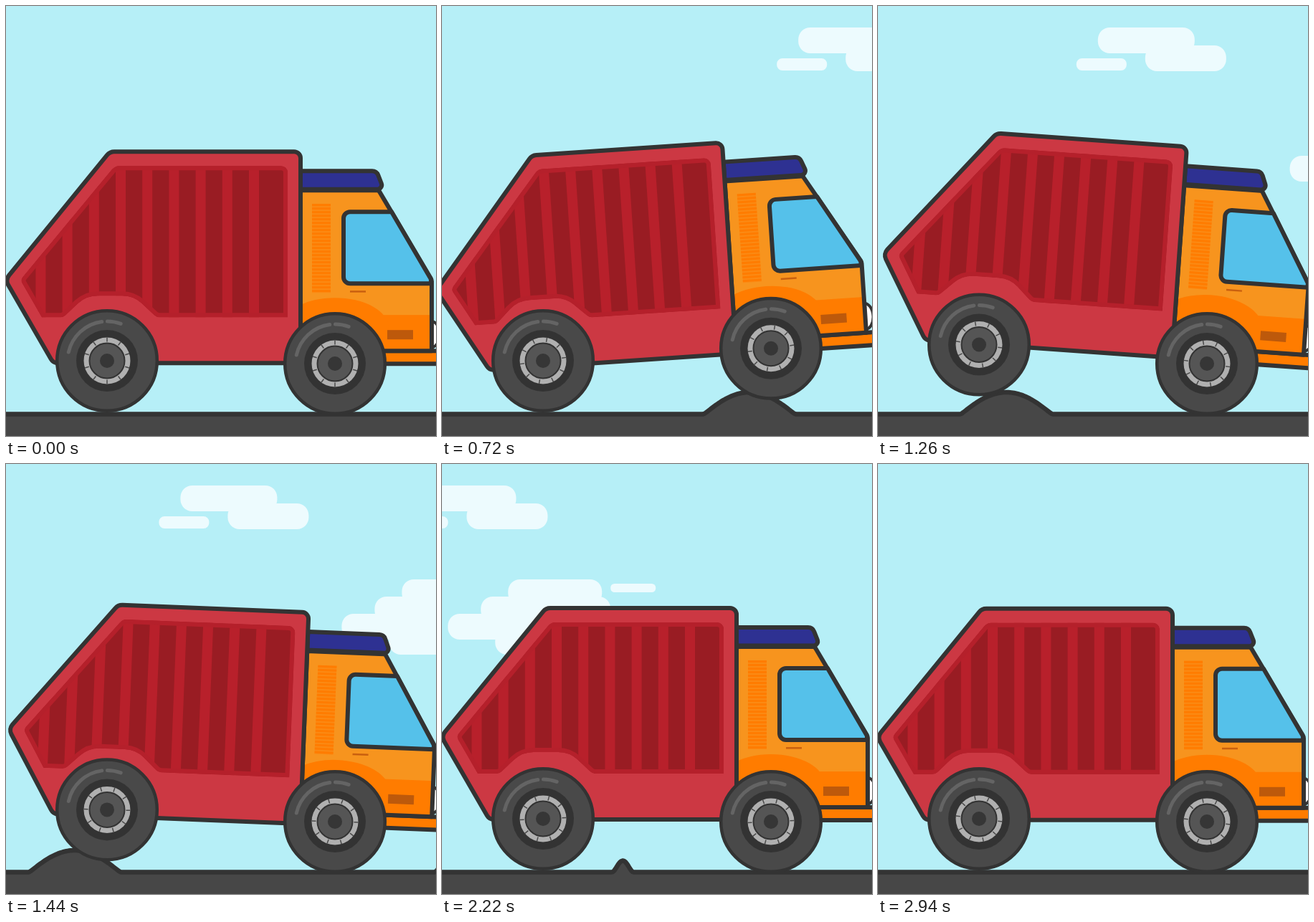
Animation of 600x600 px, one loop 2970 ms. Source, as an HTML page with a canvas:

```html
<!DOCTYPE html>
<html lang="en">
<head>
<meta charset="utf-8">
<title>Truck on a bumpy road</title>
<style>
html, body { margin: 0; width: 100%; height: 100%; overflow: hidden; background: #b6eff7; }
canvas { display: block; width: 600px; height: 600px; }
</style>
</head>
<body>
<canvas id="stage" width="600" height="600"></canvas>
<script>
const ctx = document.getElementById('stage').getContext('2d');
const LOOP = 2970, STEP = 30, TAU = Math.PI * 2;
const INK = '#333333', ORANGE = '#f7941e', DEEP = '#ff7c00';
const ROAD_SPEED = 0.4625, ROAD_Y = 569.5;
const REAR = { x: 141, y: 495 }, FRONT = { x: 459, y: 499 };

// half, power: outline; rise, fall: how far off a wheel starts to climb and lands
const HUMP = { start: 762, height: 30.5, half: 64, power: 1.15, rise: 112, fall: 81 };
const SPIKE = { start: 1279, height: 16, half: 15, power: 2, rise: 52, fall: 52 };
const OBSTACLES = [HUMP, SPIKE];

const sum = (list, f) => list.reduce((total, item) => total + f(item), 0);
const roadX = (item, t) => item.start - ROAD_SPEED * t;

const roadHeight = (x, t) => sum(OBSTACLES, o => {
  const u = (x - roadX(o, t)) / o.half;
  return o.height * Math.max(0, 1 - u * u) ** o.power;
});

const wheelLift = (wheel, t) => sum(OBSTACLES, o => {
  const d = roadX(o, t) - wheel.x;
  const u = Math.min(1, Math.abs(d) / (d > 0 ? o.rise : o.fall));
  return o.height * (1 + Math.cos(Math.PI * u)) / 2;
});

const totalLift = t => wheelLift(REAR, t) + wheelLift(FRONT, t);

// engine shake, plus springs that sag while a wheel drops
function bounce(t) {
  const shake = 0.7 + 2.8 * Math.sin(TAU * (t / 330 - 0.03));
  return shake + (totalLift(t - STEP) - totalLift(t)) / 3;
}

// closed polygon with rounded corners; points are [x, y, radius]
function shape(...points) {
  const n = points.length, last = points[n - 1];
  ctx.beginPath();
  ctx.moveTo((last[0] + points[0][0]) / 2, (last[1] + points[0][1]) / 2);
  points.forEach(([x, y, r = 0], i) => {
    const next = points[(i + 1) % n];
    ctx.arcTo(x, y, next[0], next[1], r);
  });
  ctx.closePath();
}

function paint(fill, width) {
  if (fill) {
    ctx.fillStyle = fill;
    ctx.fill();
  }
  if (width) {
    ctx.strokeStyle = INK;
    ctx.lineWidth = width;
    ctx.stroke();
  }
}

function disc(r, fill, width) {
  ctx.beginPath();
  ctx.arc(0, 0, r, 0, TAU);
  paint(fill, width);
}

function box(x, y, w, h, fill) {
  ctx.fillStyle = fill;
  ctx.fillRect(x, y, w, h);
}

const pill = (x, y, w, h) => ctx.roundRect(x, y, w, h, h * 0.46);

function drawSky(t) {
  box(0, 0, 600, 600, '#b6eff7');
  ctx.beginPath();

  const far = 721 - 0.3525 * t;
  pill(far, 73, 70, 17);
  pill(far + 30, 30, 135, 36);
  pill(far + 96, 55, 113, 36);

  const near = 1402 - 0.59 * t;
  for (let i = 0; i < 3; i++) {
    pill(near - 34 * i - 4 * i * i, 161 + 24 * i, 131 + 50 * i, 36);
  }
  pill(near - 18, 230, 238, 36);
  pill(near + 143, 167, 63, 12);
  pill(near + 203, 202, 32, 9);

  paint('#edfbfe');
}

function drawRoad(t) {
  ctx.beginPath();
  ctx.moveTo(-10, 620);
  for (let x = -10; x <= 610; x += 2) ctx.lineTo(x, ROAD_Y - roadHeight(x, t));
  ctx.lineTo(610, 620);
  ctx.closePath();
  ctx.lineJoin = 'round';
  paint('#474747', 6.5);
}

function drawCab() {
  // headlight
  ctx.beginPath();
  ctx.ellipse(594, 458, 11, 18, 0, 0, TAU);
  paint('#ffffff', 4);

  // bumper
  shape([414, 481], [620, 481], [620, 499], [414, 499]);
  paint(DEEP, 6);

  const outline = () => shape([411, 257], [520, 257, 4], [594, 382, 8], [594, 481], [411, 481]);
  outline();
  paint(ORANGE);

  // lower panel with its wheel arch
  ctx.save();
  ctx.clip();
  box(411, 431, 190, 60, DEEP);
  ctx.beginPath();
  ctx.ellipse(FRONT.x, 449, 75, 42, 0, 0, TAU);
  paint(DEEP);
  ctx.restore();

  // vent, handle and plate
  box(427, 276, 26, 124, '#fb8a14');
  for (let y = 276; y < 400; y += 5) box(427, y, 26, 3, DEEP);
  box(480, 397, 22, 2.5, '#c9600f');
  box(532, 452, 36, 13, '#bd590b');

  outline();
  paint(null, 6);

  // window
  shape([471, 287, 9], [538, 287], [593, 381, 5], [593, 387], [471, 387, 9]);
  paint('#55c1ea', 6);

  // roof
  shape([411, 230], [517, 230, 9], [527, 255.5, 6], [411, 255.5]);
  paint('#2e3192', 6);
}

function drawBin() {
  shape([145, 203, 13], [411, 203, 9], [411, 498], [66, 498, 11], [-1, 382, 12]);
  paint('#cc3843', 6);

  // ribbed panel with a bright rim
  shape([152, 223, 13], [393, 223, 9], [393, 434], [210, 434, 10],
    [178, 404, 40], [112, 404, 40], [80, 434, 10], [50, 434], [20, 382, 8]);
  ctx.save();
  ctx.clip();
  paint('#991c23');
  for (let x = 339; x > 30; x -= 37.2) box(x, 215, 14, 230, '#b8202b');
  ctx.strokeStyle = '#b5202b';
  ctx.lineWidth = 12;
  ctx.stroke();
  ctx.restore();
}

function drawWheel(x, y, turn) {
  ctx.save();
  ctx.translate(x, y);
  disc(69.8, '#494949', 4.5);
  disc(43, INK);
  disc(32.5, '#b0b0b0');

  // shine, in ever shorter dashes
  ctx.strokeStyle = '#646464';
  ctx.lineWidth = 5;
  ctx.lineCap = 'round';
  for (let a = 3.36, len = 1.22; len > 0.1; a += len + 0.14, len /= 3.5) {
    ctx.beginPath();
    ctx.arc(0, 0, 55, a, a + len);
    ctx.stroke();
  }

  ctx.save();
  ctx.rotate(turn);
  for (let i = 0; i < 10; i++) {
    ctx.rotate(TAU / 10);
    box(-0.75, -32.5, 1.5, 6, '#4a4a4a');
  }
  ctx.restore();

  disc(24.5, '#555555', 2);
  disc(10, '#363636');
  ctx.restore();
}

function draw(t) {
  const rear = wheelLift(REAR, t), front = wheelLift(FRONT, t);
  const turn = TAU * 3 * t / LOOP;

  drawSky(t);
  drawRoad(t);

  ctx.save();
  ctx.translate(REAR.x, REAR.y - rear + bounce(t));
  ctx.rotate((rear - front) / (FRONT.x - REAR.x));
  ctx.translate(-REAR.x, -REAR.y);
  drawCab();
  drawBin();
  ctx.restore();

  drawWheel(REAR.x, REAR.y - rear, turn);
  drawWheel(FRONT.x, FRONT.y - front, turn);
}

const begin = performance.now();
function tick() {
  const t = (performance.now() - begin) % LOOP;
  draw(Math.floor(t / STEP) * STEP);
  requestAnimationFrame(tick);
}
tick();
</script>
</body>
</html>
```
